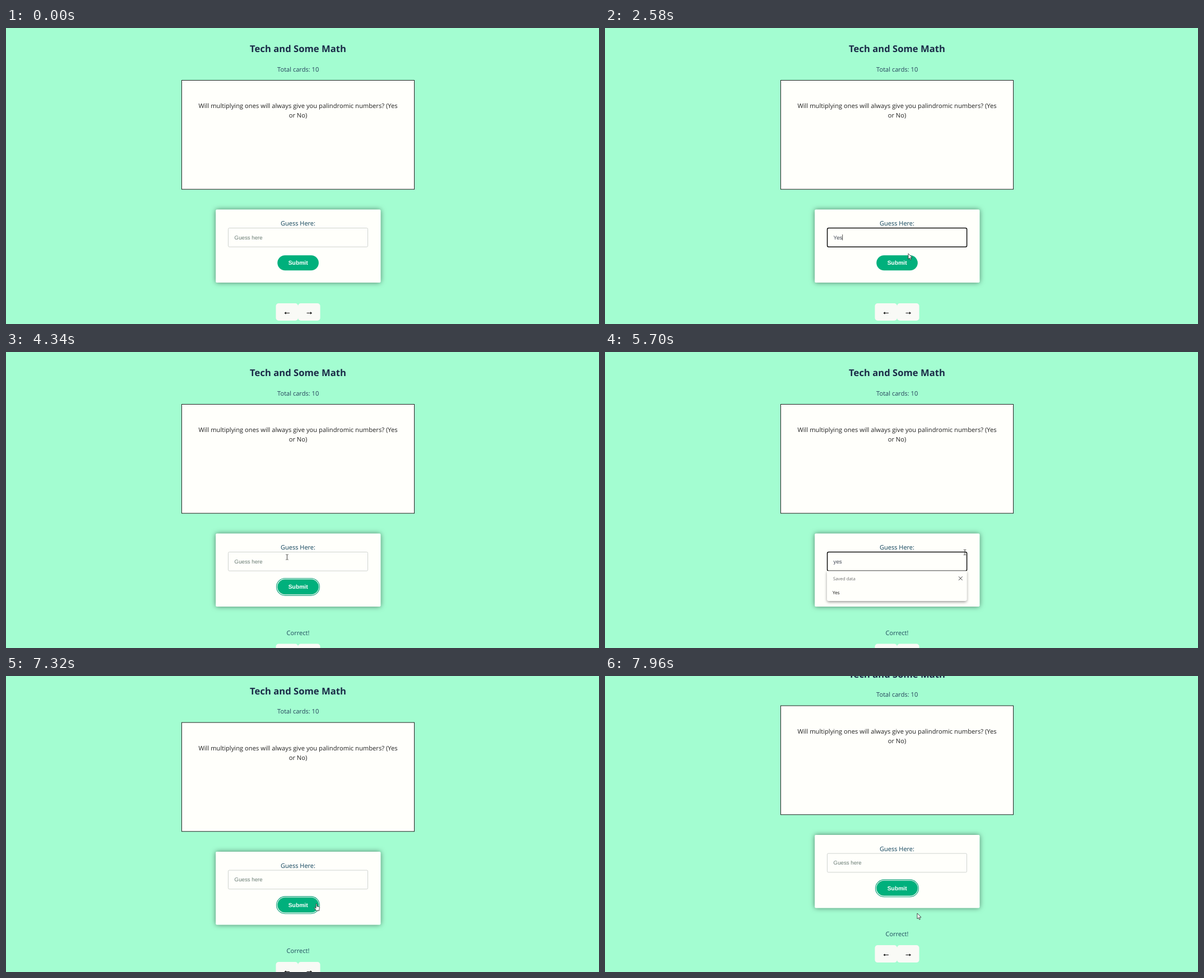
These frames come from a looping animation (1058x529 px, 7.99 s). An HTML page:

```html
<!DOCTYPE html>
<html lang="en">
<head>
<meta charset="utf-8">
<title>Flashcards</title>
<style>
  html, body { margin: 0; width: 100%; height: 100%; overflow: hidden; background: #a3fdd1; }
  svg { display: block; width: 100%; height: 100%; }
  text { font-family: "Open Sans", "Noto Sans", sans-serif; font-size: 11.2px; text-rendering: geometricPrecision; white-space: pre; }
  .mid { text-anchor: middle; }
  .ui { font-family: "Liberation Sans", Arial, sans-serif; font-size: 9.7px; }
  .paper { fill: #fffffb; }
</style>
</head>
<body>
<svg viewBox="0 0 1058 529">
  <defs>
    <filter id="glow" x="-20%" y="-30%" width="140%" height="160%">
      <feDropShadow dx="0" dy="0" stdDeviation="4.8" flood-color="#000" flood-opacity=".5"/>
    </filter>
    <filter id="lift" x="-10%" y="-30%" width="120%" height="170%">
      <feDropShadow dx="0" dy="2" stdDeviation="2.5" flood-color="#000" flood-opacity=".4"/>
    </filter>
  </defs>
  <rect width="1058" height="529" fill="#a3fdd1"/>

  <g id="page">
    <text class="mid" x="521" y="43" style="font-size:16.65px;font-weight:700" fill="#1b2c48">Tech and Some Math</text>
    <text class="mid" x="521.2" y="77.5" fill="#24405a" style="font-size:11.1px">Total cards: 10</text>

    <rect class="paper" x="313.5" y="93.5" width="415" height="194.7" stroke="#222"/>
    <text class="mid" x="521" y="143" fill="#222">Will multiplying ones will always give you palindromic numbers? (Yes</text>
    <text class="mid" x="521" y="160.4" fill="#222">or No)</text>

    <rect class="paper" x="374.3" y="324.5" width="294" height="130.5" rx="2" filter="url(#glow)"/>
    <text class="mid" x="521" y="353" fill="#0d4058" style="font-size:11px">Guess Here:</text>

    <rect id="field" class="paper"/>
    <text id="entry" class="ui" x="407.6" y="377.6"></text>
    <path id="caret" stroke="#222" stroke-width=".8"/>

    <rect id="ring" x="482.6" y="404.5" width="76.8" height="30.6" rx="15.3" fill="none" stroke="#08a078" stroke-width="1.1"/>
    <rect x="484.3" y="406.2" width="73.6" height="27" rx="13.5" fill="#00b07c"/>
    <text class="ui mid" x="521.2" y="423" fill="#fff" style="font-size:10.3px;font-weight:700">Submit</text>

    <g id="menu">
      <path class="paper" d="M396 391.3H645.5V441q0 4-4 4H400q-4 0-4-4z" filter="url(#lift)"/>
      <text x="407" y="407.5" fill="#6d6d6d" style="font-size:7.8px">Saved data</text>
      <text x="406" y="433" fill="#151515" style="font-size:8.2px">Yes</text>
      <path d="M631 401.3l6.6 6.6m0-6.6l-6.6 6.6" stroke="#333" stroke-width="1"/>
    </g>

    <text id="verdict" class="mid" x="521" y="505.5" fill="#1d4a5c" style="font-size:11.1px">Correct!</text>
    <g id="nav">
      <rect x="481.5" y="492" width="39.6" height="31" rx="5" fill="#f9faf6"/>
      <rect x="521" y="492" width="39.6" height="31" rx="5" fill="#f9faf6"/>
      <g stroke="#111" fill="#111">
        <path d="M498 509.4H506"/><path d="M496.6 509.4l3-2.3v4.6z" stroke="none"/>
        <path d="M536.6 509.4H544.6"/><path d="M546 509.4l-3-2.3v4.6z" stroke="none"/>
      </g>
    </g>
  </g>

  <path id="pointer"/>
</svg>
<script>
const LOOP = 7990;
const $ = id => document.getElementById(id);
const [page, field, entry, caret, ring, menu, verdict, nav, pointer] =
  ["page", "field", "entry", "caret", "ring", "menu", "verdict", "nav", "pointer"].map($);

// Pointer waypoints: time, x, y
const route = [
  [80, 947, 508], [180, 862, 466], [410, 862, 466], [540, 656, 405],
  [740, 656, 405], [950, 606, 423], [1250, 560, 396], [1520, 547.5, 373.5],
  [1720, 547.5, 373.5], [1750, 549, 373.5], [2450, 549, 373.5], [2580, 541, 403],
  [2740, 551, 422], [2950, 540, 414], [3710, 540, 414], [4010, 501, 366.5],
  [4340, 501.5, 366.5], [4630, 498, 371], [5300, 498, 371], [5700, 642, 358],
  [5920, 656, 360], [6130, 656, 362], [6440, 530, 418], [6800, 530, 418],
  [7010, 554, 407], [7959, 554, 407], [7960, 557, 424]
];

// Typed text: time, value
const typing = [[0, ""], [1930, "Y"], [2090, "Ye"], [2290, "Yes"], [3270, ""],
  [4780, "y"], [4950, "ye"], [5130, "yes"], [6620, ""]];

const focusSpans = [[1430, 3130], [4460, 6500]];
const ringSpans = [[3130, 4460], [6500, LOOP]];

const shapes = {
  arrow: { d: "M0 0V10L2.3 7.9 3.8 11.4 5.4 10.7 3.9 7.2H7z", fill: "#fff", stroke: "#222", "stroke-width": .8 },
  beam: { d: "M-2.2-4.6H-.6L0-4 .6-4.6H2.2M0-4V4M-2.2 4.6H-.6L0 4 .6 4.6H2.2", fill: "none", stroke: "#333", "stroke-width": .9 },
  hand: { d: "M-1 .8C-1-.4 .8-.4 .8 .8V4.7L4.6 5.5C5.4 5.7 5.7 6.3 5.5 7.2L4.8 10.2V12.3H-.3L-3.8 7.8C-4.4 6.8-3.2 6.2-2.4 7L-1 8.3z", fill: "#fff", stroke: "#222", "stroke-width": .8 }
};

const during = (t, spans) => spans.find(([a, b]) => t >= a && t < b);
const show = (el, on) => el.setAttribute("visibility", on ? "visible" : "hidden");
const set = (el, attrs) => { for (const k in attrs) el.setAttribute(k, attrs[k]); };

function pointerAt(t) {
  const i = route.findIndex(p => p[0] > t);
  if (i < 0) return route[route.length - 1].slice(1);
  const [a, b] = [route[i - 1], route[i]];
  const u = (t - a[0]) / (b[0] - a[0]);
  return [a[1] + (b[1] - a[1]) * u, a[2] + (b[2] - a[2]) * u];
}

function scrollAt(t) {
  if (t < 7320) return 0;
  if (t >= 7730) return 40.4;
  if (t >= 7690) return 39.4;
  const u = Math.min(1, (t - 7300) / 210);
  return 38.4 * (1 - (1 - u) ** 3);
}

function drawField(t) {
  const focus = during(t, focusSpans);
  set(field, focus
    ? { x: 396.6, y: 357.6, width: 249, height: 33.6, rx: 2.5, stroke: "#111", "stroke-width": 1.5 }
    : { x: 396.5, y: 357.5, width: 249, height: 33.7, rx: 2, stroke: "#cfd3d0", "stroke-width": 1 });

  const [keyTime, value] = typing.filter(k => k[0] <= t).pop();
  entry.textContent = value || "Guess here";
  set(entry, { fill: value ? "#414754" : "#6b7d75" });

  const blinkStart = focus ? Math.max(focus[0], keyTime) : 0;
  show(caret, focus && Math.floor((t - blinkStart) / 530) % 2 === 0);
  const x = 407.6 + (value ? entry.getComputedTextLength() + .3 : 0);
  set(caret, { d: `M${x} 369V379.4` });
}

function drawPointer(t, scroll) {
  show(pointer, t >= 80);
  if (t < 80) return;
  const [x, y] = pointerAt(t);
  const py = y + scroll;
  const inField = x > 396 && x < 646 && py > 357 && py < 391;
  const inButton = x > 484 && x < 558 && py > 406 && py < 433;
  set(pointer, shapes[inField ? "beam" : inButton ? "hand" : "arrow"]);
  set(pointer, { transform: `translate(${x} ${y})` });
}

function render(t) {
  const scroll = scrollAt(t);
  const answered = t >= 3270;
  set(page, { transform: `translate(0 ${-scroll})` });
  set(nav, { transform: `translate(0 ${answered ? 29.5 : 0})` });
  show(verdict, answered);
  show(ring, during(t, ringSpans));
  show(menu, t >= 4870 && t < 6080);
  drawField(t);
  drawPointer(t, scroll);
}

const start = performance.now();
function tick() {
  render((performance.now() - start) % LOOP);
  requestAnimationFrame(tick);
}
tick();
</script>
</body>
</html>
```
